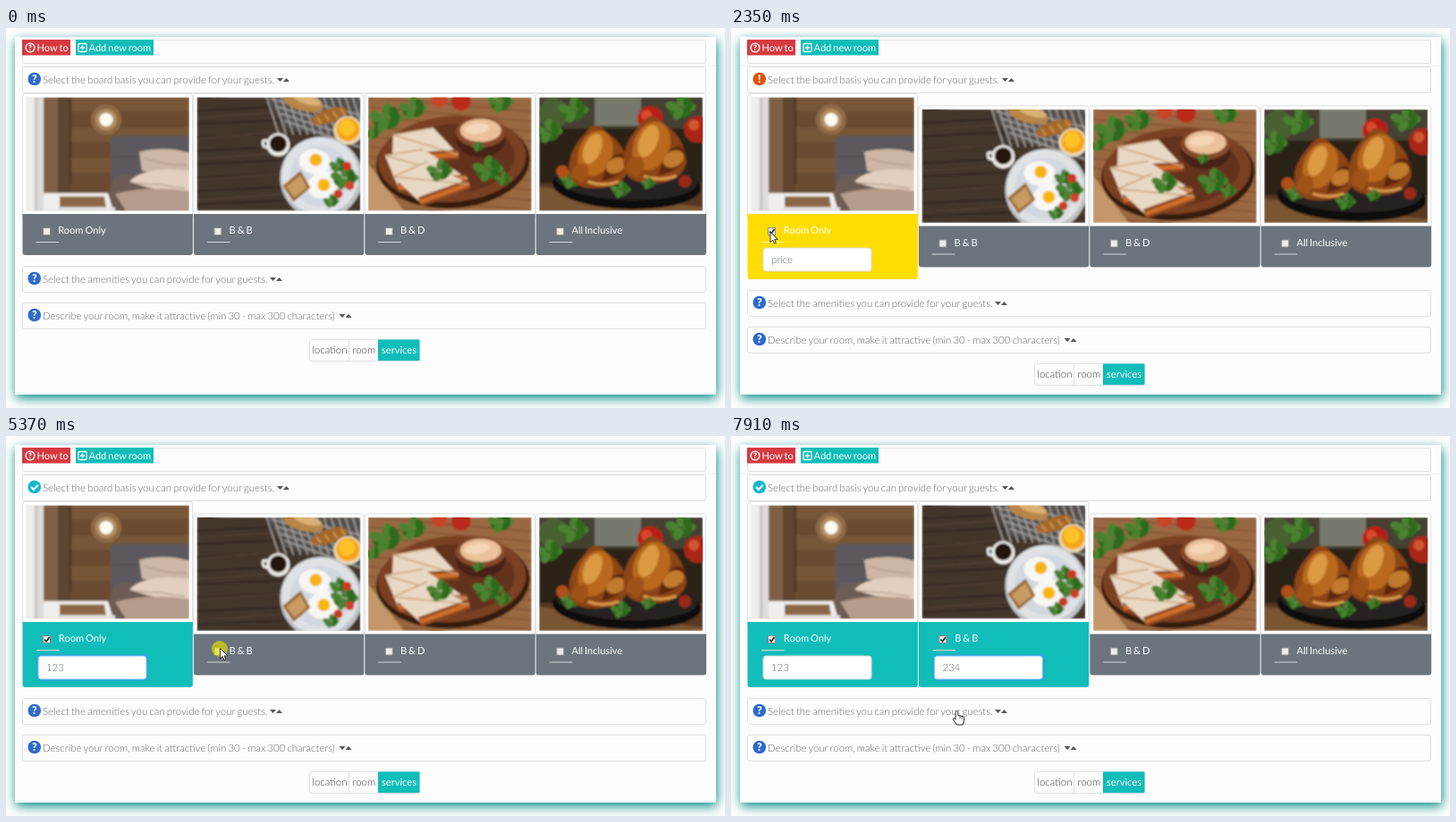
Animation, 804 px wide and 425 px high, one loop 8 s. Source, as an HTML page:

```html
<!DOCTYPE html>
<html lang="en">
<head>
<meta charset="utf-8">
<title>Room services form</title>
<style>
html, body { margin: 0; width: 100%; height: 100%; overflow: hidden; background: #fff; }
.panel { position: absolute; left: 10px; top: 10px; width: 784px; height: 400px; background: #fdfdfd; box-shadow: 1px 4px 12px #078a83; }
svg { position: absolute; left: 0; top: 0; }
text { font: 300 11.4px Lato, sans-serif; word-spacing: -.9px; fill: #63686d; text-rendering: geometricPrecision; white-space: pre; }
.bold { font-weight: 900; text-anchor: middle; }
.light { font-weight: 400; font-size: 11.1px; fill: #fff; }
</style>
</head>
<body>
<div class="panel"></div>
<svg width="804" height="425" viewBox="0 0 804 425">
  <defs id="photos"></defs>
  <g id="scene"></g>
</svg>
<script>
const LOOP = 8000, TEAL = '#11bdb9', GRAY = '#6c757d', YELLOW = '#ffdd00', LINE = '#dee0e2';
const $ = id => document.getElementById(id);

// Shape helpers
const rect = (x, y, w, h, fill, extra = '') => `<rect x="${x}" y="${y}" width="${w}" height="${h}" fill="${fill}" ${extra}/>`;
const oval = (x, y, rx, ry, fill, turn = 0) =>
  `<ellipse rx="${rx}" ry="${ry}" fill="${fill}" transform="translate(${x} ${y}) rotate(${turn})"/>`;
const disc = (x, y, r, fill) => oval(x, y, r, r, fill);
const path = (d, fill, extra = '') => `<path d="${d}" fill="${fill}" ${extra}/>`;
const line = (d, color, width = 1) => path(d, 'none', `stroke="${color}" stroke-width="${width}"`);
const text = (x, y, s, style = '', kind = '') => `<text x="${x}" y="${y}" class="${kind}" style="${style}">${s}</text>`;
const at = (x, y, s) => `<g transform="translate(${x} ${y})">${s}</g>`;
const frame = (x, y, w, h, fill = 'none') => rect(x + .5, y + .5, w - 1, h - 1, fill, `rx="2.5" stroke="${LINE}"`);
const repeat = (n, f) => Array.from({ length: n }, (_, i) => f(i)).join('');

// Photo ingredients
const herb = (x, y, r) => repeat(7, i => oval(x + Math.cos(i * 2.4) * r * .65, y + Math.sin(i * 2.4) * r * .5,
  r * .5, r * .32, i % 2 ? '#2f6b1b' : '#4c8230', i * 50));
const planks = (step, color, slope) => repeat(Math.ceil(150 / step), i => line(`M0 ${i * step}L183 ${i * step + slope}`, color, 1.2));

const bedroom = () =>
  rect(0, 0, 183, 127, '#694b31') +
  repeat(5, i => rect(50, i * 17, 133, 16, i % 2 ? '#6b4c30' : '#775638')) +
  rect(20, 0, 30, 108, '#7f6046') + rect(36, 0, 14, 108, '#5f442f') + line('M50 0V97', '#3f2c1f', 1.5) +
  rect(0, 0, 20, 127, '#dedbd9') + rect(0, 0, 9, 127, '#efeeed') + rect(11, 0, 2, 127, '#c2bdb9') +
  disc(90, 25, 17, '#8e6a46') + disc(90, 25, 12, '#b18d62') + disc(90, 25, 7.5, '#fffdf2') +
  path('M95 48Q96 43 101 43H183V110H95Z', '#5b595d') + line('M97 66H183', '#4c4a4f') +
  path('M92 108L100 88L183 82V127H96Z', '#6d5b52') +
  path('M127 61Q155 54 183 62V89Q150 88 130 82Z', '#cdb6a5') +
  path('M116 94Q135 76 183 82V108Q140 104 116 94Z', '#e2cfc0') +
  path('M100 108Q140 98 183 105V127H112Z', '#b59c8b') + line('M120 96Q150 96 178 102M132 68Q155 76 180 76', '#a68f80') +
  path('M20 107H92L98 127H20Z', '#f0eeec') + path('M38 111H88L90 123H38Z', '#8a6747') + rect(36, 123, 64, 4, '#e6e2df');

const breakfast = () =>
  rect(0, 0, 183, 127, '#42342c') + planks(15, '#261e1a', -9) + planks(23, '#564439', -13) +
  path('M78 0H183V58L138 43L98 33Z', '#55504e') +
  repeat(14, i => line(`M${78 + i * 8} 0L${92 + i * 8} 42`, '#a5a29e', 1.6)) +
  repeat(5, i => line(`M${78 + i * 5} ${i * 8 - 6}L183 ${20 + i * 9}`, '#a5a29e', 1.6)) +
  oval(119, 6, 23, 9, '#b98649', 15) + oval(124, 3, 16, 5, '#dcb174', 15) +
  oval(148, 21, 21, 8, '#a4672b', -18) + repeat(4, i => line(`M${134 + i * 9} ${22 - i * 3}l5 7`, '#cf9755', 2)) +
  disc(169, 37, 16, '#e9d9b4') + disc(169, 36, 13, '#f5a516') + disc(168, 34, 9, '#ffc32c') +
  disc(91, 53, 13, '#eeeae5') + line('M80 49Q71 46 75 55L82 57', '#eeeae5', 3) + disc(91, 52, 9.5, '#241610') +
  disc(139, 90, 46, '#c0c2c4') + disc(138, 88, 43, '#dfe2e5') + disc(138, 88, 34, '#d2d8df') +
  oval(132, 72, 18, 14, '#f7f7f5', 10) + disc(133, 70, 7, '#f6b314') +
  oval(143, 98, 20, 15, '#f7f7f5', -15) + disc(142, 98, 7, '#f9b70d') +
  path('M96 99L116 82L127 101L108 117Z', '#9c6a36') + path('M100 100L116 87L123 101L109 112Z', '#c89c63') +
  herb(165, 90, 14) + herb(158, 76, 9) + disc(168, 77, 5, '#cf3521') + disc(171, 99, 5, '#d3402a') + disc(158, 108, 5, '#c93a20') +
  herb(150, 116, 8);

const wrap = (a, b, c, d) => path(`M${a}L${b}L${c}L${d}Z`, '#e9d8c3') + line(`M${d}L${c}`, '#8d4a22', 11) +
  line(`M${d}L${c}`, '#d06d2a', 5) + line(`M${a}L${c}M${a}L${b}`, '#c7a27c', 1.5);
const quesadilla = () =>
  rect(0, 0, 183, 127, '#9a6840') + planks(11, '#7b4c2d', 16) +
  path('M0 74L40 127H0Z', '#c4976a') + herb(20, 23, 17) + herb(50, 12, 14) + herb(5, 40, 8) +
  disc(104, 4, 11, '#b92b1b') + disc(80, 2, 9, '#c9452b') + herb(148, 5, 13) +
  oval(95, 73, 86, 51, '#351b11', -4) + oval(94, 69, 83, 48, '#7a3f24', -4) + oval(94, 69, 70, 39, '#63311d', -4) +
  oval(126, 46, 28, 21, '#462213') + oval(126, 39, 28, 17, '#86492c') + oval(126, 37, 23, 13, '#ecc09a') + oval(122, 35, 14, 6, '#f6d7b5', -8) +
  wrap('28 42', '73 34', '101 64', '27 69') + wrap('19 65', '62 58', '111 91', '34 101') + wrap('28 89', '66 72', '113 97', '58 117') +
  herb(80, 82, 13) + herb(134, 80, 15) + herb(151, 91, 8) + herb(123, 55, 6);

const bird = (x, y, s) => `<g transform="translate(${x} ${y}) scale(${s})">` +
  path('M-31 19Q-36-5-15-26Q-4-43 8-27Q29-15 31 12Q25 34-8 32Q-27 31-31 19Z', '#8c4415') +
  oval(-4, -5, 18, 25, '#b8691f', 20) + oval(-7, -10, 9, 17, '#dc9a45', 22) +
  path('M8 7Q21-12 30 0Q30 19 3 24Z', '#5f280d') + oval(18, 8, 11, 8, '#c27a2f', -25) +
  path('M-30 20Q-27 2-14 7Q-7 15-18 27Z', '#a05318') + line('M-12 25Q4 31 21 25', '#d99a4e', 3) + '</g>';
const roast = () =>
  rect(0, 0, 183, 127, '#2a2018') + rect(0, 0, 183, 35, '#453f31') + rect(62, 0, 52, 32, '#77796c') +
  disc(16, 18, 17, '#4b6130') + herb(38, 14, 15) + herb(10, 38, 14) + herb(158, 11, 15) +
  disc(124, 24, 14, '#b91e12') + disc(120, 20, 6, '#d9492f') + disc(177, 36, 15, '#a92718') + disc(173, 31, 6, '#d15733') +
  rect(0, 96, 183, 31, '#573820') + path('M0 100L183 123V127H0Z', '#7a5430') +
  oval(98, 99, 83, 26, '#0d0c0c', 2) + oval(98, 93, 79, 22, '#282321', 2) +
  herb(36, 91, 12) + herb(91, 103, 10) + disc(26, 83, 7, '#b04f1c') + disc(163, 94, 7, '#962a16') +
  bird(67, 68, 1.05) + bird(130, 60, 1.12) + herb(122, 96, 7);

$('photos').innerHTML = `<clipPath id="crop">${rect(0, 0, 183, 127, '#000')}</clipPath>
  <filter id="soft"><feGaussianBlur stdDeviation=".9"/></filter>` +
  [bedroom, breakfast, quesadilla, roast].map((photo, i) =>
    `<g id="photo${i}" clip-path="url(#crop)"><g filter="url(#soft)">${photo()}</g></g>`).join('');

// Interface parts
const BADGES = {
  ask: ['#2f6bcb', '?'], warn: ['#e0530f', '!'], done: ['#12b5cf', '']
};
function badge(x, y, kind) {
  const [color, sign] = BADGES[kind];
  return disc(x, y, 7.3, color) + (sign
    ? text(x, y + 4.3, sign, 'fill:#fff;font-size:12px', 'bold')
    : line(`M${x - 3.8} ${y}l2.9 2.9l5-5.2`, '#fff', 2.2));
}

function section(y, label, arrowX, badges) {
  const shift = (badges.length - 1) * 17;
  return frame(18, y, 765, 30, '#fdfdfd') + badges.map((kind, i) => badge(31.8 + i * 17, y + 14, kind)).join('') +
    text(41 + shift, y + 19, label) +
    at(arrowX + shift, y + 13, path('M0 0h7l-3.5 4zM7 4h7l-3.5-4z', '#555'));
}

const toolbar = frame(18, 13, 765, 27) + line('M10 42.5H794', '#eee') +
  rect(18, 13, 54, 17.5, '#d63a40') + `<circle cx="27" cy="22" r="4.9" fill="none" stroke="#fff" stroke-width="1.4"/>` +
  text(27, 25.2, '?', 'fill:#fff;font-size:8.5px', 'bold') +
  text(34.5, 26, 'How to', '', 'light') +
  rect(78, 13, 87, 17.5, TEAL) + rect(81, 17.5, 9, 9, 'none', 'rx="1" stroke="#fff" stroke-width="1.3"') +
  line('M83 22h5M85.5 19.5v5', '#fff', 1.4) +
  text(92.5, 26, 'Add new room', '', 'light');

const pager = frame(339, 0, 124, 25, '#fff') + line('M383.5 1V24', LINE) + rect(416, .5, 46.5, 23.5, TEAL) +
  text(342.5, 16, 'location', 'fill:#333') + text(387.5, 16, 'room', 'fill:#333') + text(420, 16, 'services', '', 'light');

function priceInput({ value, focus, caret }) {
  const caretX = 27 + value.length * 6.5;
  return (focus ? rect(16.4, 171.9, 123.2, 28.2, 'none', `rx="4" stroke="#3b8cf0" stroke-opacity="${.4 * focus}" stroke-width="2.2"`) : '') +
    rect(17.5, 173, 121, 26, '#fff', `rx="3" stroke="${focus ? '#80bdff' : '#d5dadd'}"`) +
    text(26.5, 190, value || 'price') +
    (caret ? line(`M${caretX} 179.5V193`, '#333') : '');
}

function card(index, label, card, expanded) {
  const color = !card.checked ? GRAY : card.value ? TEAL : YELLOW;
  const lowered = expanded && !card.checked ? 13.5 : 0;
  const nudge = card.checked ? .6 : 0;
  return at(18.5 + index * 191.4, 73 + lowered,
    rect(0, .5, 190, 140, '#fff', `rx="3" stroke="${LINE}"`) +
    `<use href="#photo${index}" x="3.5" y="4.5"/>` +
    path(`M0 135H190.4V${card.checked ? 205 : 178}q0 3-3 3H3q-3 0-3-3Z`, color) +
    rect(23, 150.5, 8, 8, '#ececec', 'stroke="#8c8c8c"') +
    (card.checked ? line('M24.6 154.5l2 2.2l3.4-4.6', '#222', 1.6) : '') +
    line(`M${15 + nudge} 166.5h25.5`, color === YELLOW ? '#fff3a0' : '#d3d6d8') +
    text(39.7 + nudge, 157, label, '', 'light') +
    (card.checked ? priceInput(card) : ''));
}

// Pointer shapes, anchored at their hot spots
const POINTERS = {
  arrow: path('M0 0V11.5L2.7 9.1L4.5 13.2L6.3 12.4L4.6 8.4H8.3Z', '#fff', 'stroke="#222" stroke-width=".9"'),
  beam: line('M-2.7-6H-.7L0-5.4.7-6H2.7M0-5.4V5.4M-2.7 6H-.7L0 5.4.7 6H2.7', '#222', 1.1),
  hand: path('M-1.4 1Q0-1 1.4 1V5L6.5 6Q8.2 6.5 8.2 8V11L6.6 15.5H0L-3.8 10Q-4.6 8-3 8L-1.4 9.3Z', '#fff', 'stroke="#222"') +
    line('M3.5 5.6v3M5.8 6v3', '#222', .7)
};

// [time, shape, x, y, click glow]
const MOVES = [
  [0], [300, 'arrow', 674, 394], [460, 'arrow', 545, 366], [620, 'arrow', 345, 313], [770, 'arrow', 160, 260],
  [930, 'arrow', 68, 234], [1090, 'arrow', 43, 226.5], [1870, 'arrow', 43, 226.5, .7], [2030, 'arrow', 43, 226.5, .35],
  [2180, 'arrow', 43, 226.5], [2350, 'arrow', 44, 228], [2500, 'arrow', 57, 243], [2670, 'beam', 67, 255.5],
  [4720, 'beam', 72, 255], [4880, 'arrow', 110, 252], [5040, 'arrow', 190, 243], [5210, 'arrow', 239.5, 237.5],
  [5370, 'arrow', 239.5, 237.5, .65], [5520, 'beam', 249, 256], [5680, 'beam', 256, 261], [5840, 'beam', 258.5, 263],
  [7740, 'beam', 256, 268], [7910, 'hand', 252.5, 307.5]
];

// Each priced card: check, focus and blur times, then one time per digit
const ACTIONS = [
  { check: 2350, focus: 2840, blur: 5520, digits: '123', keys: [3630, 4090, 4560] },
  { check: 5520, focus: 5990, blur: LOOP, digits: '234', keys: [6470, 6790, 7110] }
];

function cardState(action, t) {
  if (!action) return { checked: false };
  const typed = action.keys.filter(k => k <= t).length;
  const focused = t >= action.focus && t < action.blur;
  const lastInput = typed ? action.keys[typed - 1] : action.focus;
  return {
    checked: t >= action.check,
    value: action.digits.slice(0, typed),
    focus: focused ? (t < action.focus + 150 ? .5 : 1) : 0,
    caret: focused && (t - lastInput) % 920 < 460
  };
}

function render(t) {
  const cards = [0, 1, 2, 3].map(i => cardState(ACTIONS[i], t));
  const chosen = cards.filter(c => c.checked), expanded = chosen.length > 0;
  const badges = [];
  if (!expanded) badges.push('ask');
  if (chosen.some(c => c.value)) badges.push('done');
  if (chosen.some(c => !c.value)) badges.push('warn');
  const drop = expanded ? 27 : 0;
  const [, shape, x, y, glow] = MOVES.findLast(m => m[0] <= t);

  return toolbar +
    section(43, 'Select the board basis you can provide for your guests.', 303, badges) +
    ['Room Only', 'B &amp; B', 'B &amp; D', 'All Inclusive'].map((label, i) => card(i, label, cards[i], expanded)).join('') +
    section(266 + drop, 'Select the amenities you can provide for your guests.', 295, ['ask']) +
    section(307 + drop, 'Describe your room, make it attractive (min 30 - max 300 characters)', 372.5, ['ask']) +
    at(0, 348 + drop, pager) +
    (glow ? `<g opacity="${glow}">${disc(x - .5, y + .5, 9, '#dfe000')}</g>` : '') +
    (shape ? at(x, y, POINTERS[shape]) : '');
}

let shown = '';
function tick() {
  const markup = render(performance.now() % LOOP);
  if (markup !== shown) $('scene').innerHTML = shown = markup;
  requestAnimationFrame(tick);
}
tick();
</script>
</body>
</html>
```
